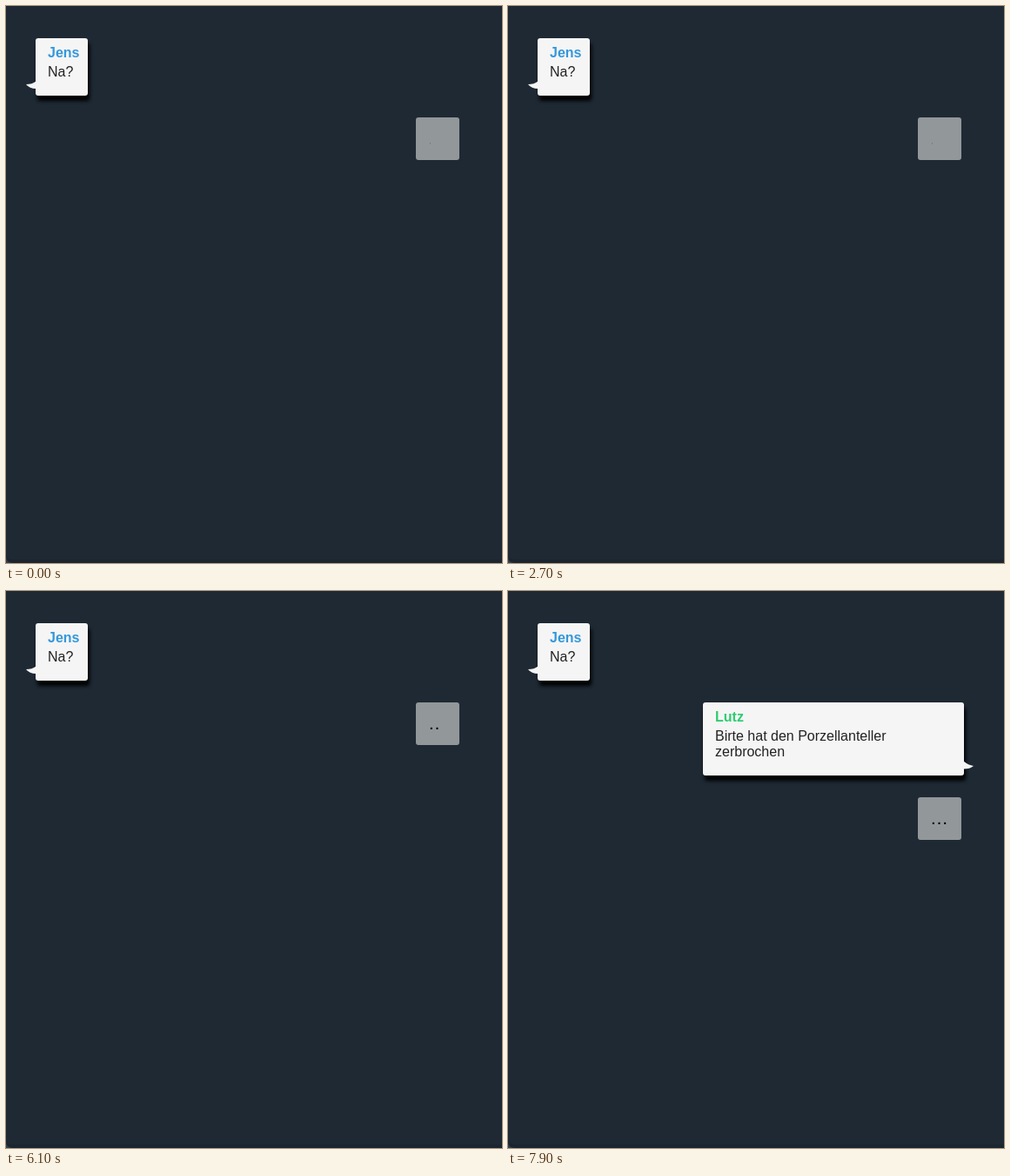
These frames come from a looping animation (570 by 640 pixels, 8000 ms). An HTML page:

```html
<!DOCTYPE html>
<html lang="de">
<head>
<meta charset="utf-8">
<title>Chat</title>
<style>
  html, body { margin: 0; width: 100%; height: 100%; overflow: hidden; background: #36414b; }
  svg { display: block; width: 570px; height: 640px; }
  text { font: 16px "Liberation Sans", Arial, sans-serif; fill: #222; }
  .name { font-weight: bold; }
  .bubble, .tail { fill: #f5f5f5; }
  .bubble { filter: drop-shadow(2px 6px 2px #000); }
  .dots { font-size: 21px; fill: #000; }
</style>
</head>
<body>
<svg viewBox="0 0 570 640">
  <defs>
    <clipPath id="reveal"><rect id="edge" x="485" y="150" width="0" height="14"/></clipPath>
  </defs>
  <path d="M0 0H570V640H8Q0 640 0 632Z" fill="#1a2530"/>
  <path d="M0 0H570V636H8Q2 636 0 631Z" fill="#1e2933"/>

  <g>
    <rect class="bubble" x="34" y="37" width="60" height="66" rx="3"/>
    <path class="tail" d="M34.5 86.5Q30 90 23 90Q27 95 34.5 95Z"/>
    <text class="name" x="48" y="59" style="fill:#3498db">Jens</text>
    <text x="48" y="81">Na?</text>
  </g>

  <g id="reply" visibility="hidden">
    <rect class="bubble" x="224" y="128" width="300" height="84" rx="3"/>
    <path class="tail" d="M523.5 195.5Q529 200 535 201Q531 204.5 523.5 204.5Z"/>
    <text class="name" x="238" y="150" style="fill:#2ecc71">Lutz</text>
    <text x="238" y="172">Birte hat den Porzellanteller</text>
    <text x="238" y="190">zerbrochen</text>
  </g>

  <g id="typing">
    <rect x="471" y="128" width="50" height="49" rx="3" fill="#92979a"/>
    <g clip-path="url(#reveal)"><text class="dots" x="485" y="159">…</text></g>
  </g>
</svg>
<script>
  const LOOP = 8000, TICK = 100, REPLY_AT = 7100;
  const CYCLE = 1370, PHASE = 285;
  const DOT_DELAY = 454, DOT_PITCH = 7;
  const COLUMN_TIMES = [188, 290, 364]; // reveal of each pixel column of a dot

  const [edge, reply, typing] = ["edge", "reply", "typing"].map(id => document.getElementById(id));

  function revealedWidth(phase) {
    let width = 0;
    for (let dot = 0; dot < 3; dot++)
      COLUMN_TIMES.forEach((time, column) => {
        if (phase >= time + dot * DOT_DELAY) width = 3 + dot * DOT_PITCH + column;
      });
    return width;
  }

  function draw(now) {
    const elapsed = Math.max(0, now - start) % LOOP;
    const t = Math.floor(elapsed / TICK) * TICK;
    const replied = t >= REPLY_AT;
    reply.setAttribute("visibility", replied ? "visible" : "hidden");
    typing.setAttribute("transform", `translate(0 ${replied ? 109 : 0})`);
    edge.setAttribute("width", revealedWidth((t + PHASE) % CYCLE));
  }

  const start = performance.now();
  function loop() {
    draw(performance.now());
    requestAnimationFrame(loop);
  }
  loop();
</script>
</body>
</html>
```
